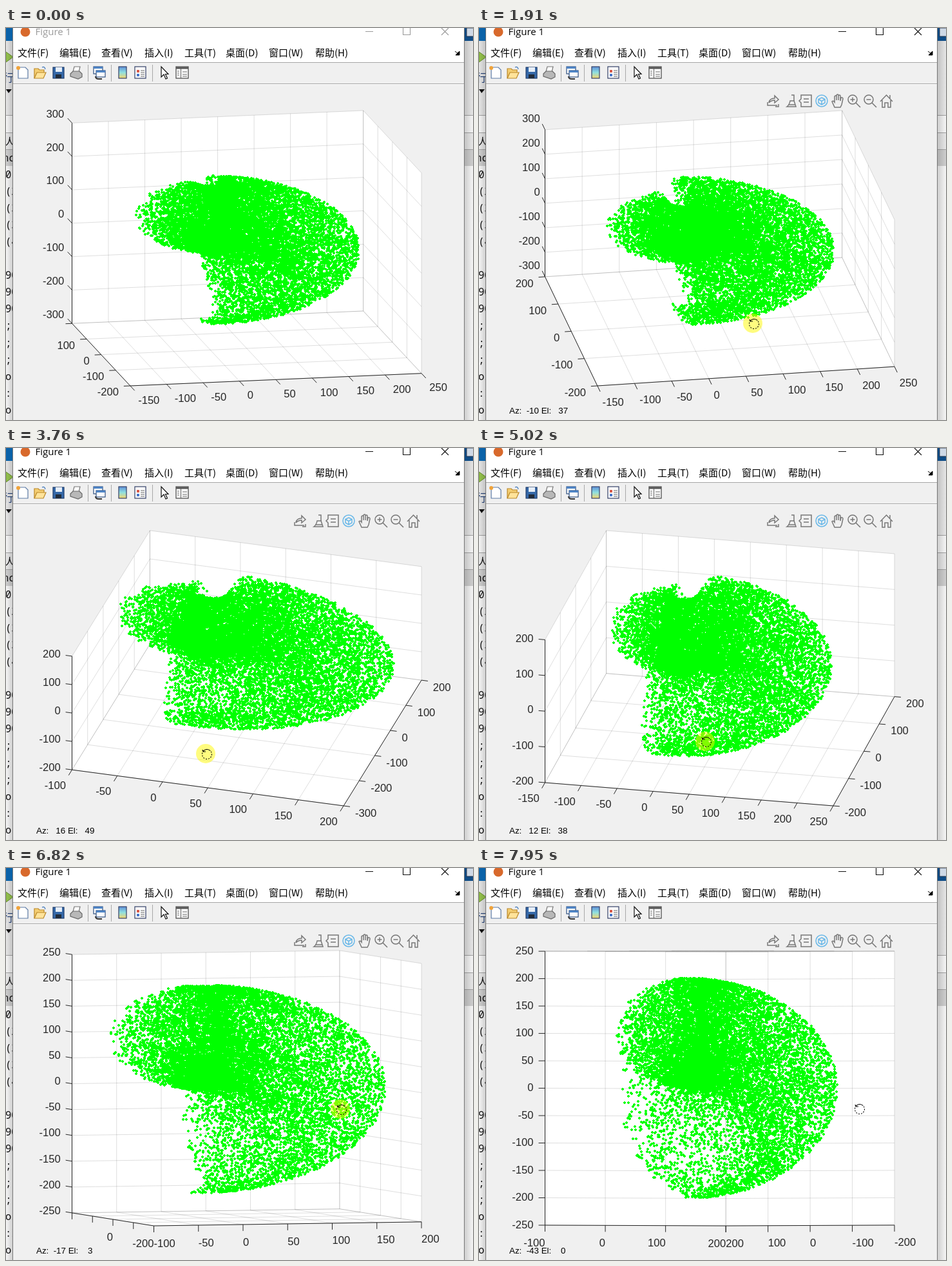
Write an HTML page with a canvas that moves like this. It is 725x608 px and loops after 8 s.

```html
<!DOCTYPE html>
<html lang="zh">
<head>
<meta charset="utf-8">
<title>Figure 1</title>
<style>
html, body { margin: 0; width: 100%; height: 100%; overflow: hidden; background: #fff; }
svg, canvas { position: absolute; left: 0; top: 0; width: 725px; height: 608px; }
.ui { font: 15px "Noto Sans CJK SC", "Noto Sans CJK", "Open Sans", sans-serif; }
.code { font: 15.5px "Noto Sans Mono", "Noto Sans CJK SC", monospace; fill: #111; }
.inactive .title { fill: #9a9a9a; }
.inactive .buttons { stroke: #9a9a9a; }
.line { fill: none; stroke: #777; stroke-width: 1.5; }
</style>
</head>
<body>
<svg id="chrome" viewBox="0 0 725 608">
  <linearGradient id="bar" x2="0" y2="1"><stop stop-color="#5f8fd8"/><stop offset=".5" stop-color="#8fe0e0"/><stop offset="1" stop-color="#f6d56a"/></linearGradient>
  <linearGradient id="shade"><stop stop-opacity=".04"/><stop offset="1" stop-opacity=".2"/></linearGradient>
  <!-- editor behind the figure window -->
  <rect width="725" height="608" fill="#fff"/>
  <rect width="11" height="20" fill="#0b62a8"/>
  <rect x="711" width="14" height="20" fill="#0f4c86"/>
  <rect y="20" width="725" height="115" fill="#efefef"/>
  <path d="M0 135.5H725M0 162.5H725M0 188.5H725" stroke="#a8a8a8"/>
  <rect y="163" width="725" height="25" fill="#f0f0f0"/>
  <rect y="189" width="725" height="25" fill="#d6d6d6"/>
  <path d="M0 37L11 45L0 53Z" fill="#9ccc50" stroke="#6b9430"/>
  <path d="M0 95H9L4 101Z" fill="#111"/>
  <rect x="715" y="0" width="12" height="13" fill="#cfd9e6" stroke="#25354d"/>
  <g class="code" id="code"></g>
  <rect y="20" width="11" height="588" fill="url(#shade)"/>
  <rect x="-725" y="20" width="14" height="588" fill="url(#shade)" transform="scale(-1 1)"/>
  <!-- figure window -->
  <rect x="11" width="700" height="608" fill="#f0f0f0"/>
  <rect x="11" width="700" height="53" fill="#fff"/>
  <path d="M10.5 0V608M711.5 0V608" stroke="#777"/>
  <path d="M11 53.5H711M11 86.5H711" stroke="#a6a6a6"/>
  <path d="M11 87.5H711" stroke="#fff"/>
  <circle cx="30" cy="6" r="7.5" fill="#d8692c"/>
  <text class="title" x="45.500" y="11" style="font:15px 'Open Sans',sans-serif">Figure 1</text>
  <path class="buttons" d="M558 5.500H570M616.500 -1V10.500H627.500V-1M676 0L687 11M687 0L676 11" fill="none" stroke="#111" stroke-width="1.100"/>
  <g class="ui" id="menu"></g>
  <path d="M697 36l5 4M704 36v6h-6z" stroke="#000" fill="#000"/>
  <!-- toolbar -->
  <path d="M127.500 57V83M163.500 57V83M227.500 57V83" stroke="#a9a9a9"/>
  <g stroke-width="1.200">
    <path d="M19 61H30L34 65V78H19Z" fill="#fff" stroke="#5c7aa5"/>
    <circle cx="19" cy="62" r="3" fill="#f0a33a"/>
    <path d="M44 78V63H50L52 65H59V69" fill="#f4ce72" stroke="#b98728"/>
    <path d="M44 78L48 69H62L58 78Z" fill="#ffe39a" stroke="#b98728"/>
    <path d="M56 61q4 -2 5 3" fill="none" stroke="#3d75b8"/>
    <rect x="73" y="61" width="17" height="17" fill="#3568a8" stroke="#1f3d6b"/>
    <rect x="77" y="61" width="10" height="7" fill="#e6eef8"/>
    <rect x="77" y="72" width="9" height="6" fill="#222c3a"/>
    <path d="M104 68L106 60H115L113 68Z" fill="#fff" stroke="#777"/>
    <path d="M100 71L104 67H114L118 71V76L112 79L100 75Z" fill="#b8b8b8" stroke="#666"/>
    <rect x="136" y="60" width="14" height="11" fill="#fff" stroke="#2d4f80"/>
    <path d="M136 61.500H150" stroke="#4d83c4" stroke-width="3"/>
    <rect x="140" y="66" width="14" height="10" fill="#fff" stroke="#2d4f80"/>
    <path d="M140 67.500H154" stroke="#4d83c4" stroke-width="3"/>
    <path d="M139 75q0 4 5 4h5" fill="none" stroke="#333" stroke-width="2"/>
    <rect x="175" y="60" width="12" height="18" fill="url(#bar)" stroke="#333f66"/>
    <rect x="200" y="60" width="17" height="18" fill="#fff" stroke="#333f66"/>
    <path d="M203 65h4v4h-4z" fill="#d75a4a"/><path d="M203 71h4v4h-4z" fill="#4a78cc"/>
    <path d="M209 66h6M209 69h6M209 72h6M209 75h6" stroke="#666"/>
    <path d="M241 60V76L245 72L248 79L250.500 78L247.500 71.500H252Z" fill="#fff" stroke="#111"/>
    <rect x="264" y="60" width="19" height="18" fill="#fff" stroke="#444"/>
    <path d="M264 62H283" stroke="#555" stroke-width="3"/>
    <path d="M271.500 63V78M266 67h3M266 70h3M266 73h3M274 68h7M274 72h7M274 75h7" stroke="#6a6a6a"/>
  </g>
  <!-- axes toolbar -->
  <g class="line" id="axesBar">
    <path d="M448 115v5h15M450 116q1 -7 9 -7v-4l6 6l-6 5v-4q-5 0 -9 4M465 118v4h-5"/>
    <path d="M485 104h4v9l3 9h-14q4 -3 5 -9h7M480 119h11" />
    <path d="M500 104h16v18h-16v-6l-3 -3l3 -3zM504 110h8M504 115h8"/>
    <g stroke="#69b8e8"><circle cx="532" cy="113" r="9"/><path d="M532 108l5 2.500v5.500l-5 3l-5 -3v-5.500zM527 110.500l5 3l5 -3M532 113.500v5"/></g>
    <path d="M552 123l-4 -9q2 -2 4 1v-9q2 -2 3 0v6v-8q2 -2 3 0v8v-7q2 -2 3 0v8l1 -5q3 -1 3 2l-2 9l-2 4z"/>
    <g id="lens"><circle cx="580" cy="111" r="7"/><path d="M585 116l7 7M576.500 111h7"/></g>
    <path d="M580 107.500v7"/>
    <use href="#lens" x="25"/>
    <path d="M623 114l9.500 -10l9.500 10M626 112v11h4v-7h5v7h4v-11M638 109v-5"/>
  </g>
</svg>
<canvas id="plot" width="725" height="608"></canvas>
<script>
const LOOP = 8000;
const chrome = document.getElementById('chrome');
const axesBar = document.getElementById('axesBar');
const ctx = document.getElementById('plot').getContext('2d');

function addText(parent, str, x, y, fill) {
  const el = document.createElementNS('http://www.w3.org/2000/svg', 'text');
  el.textContent = str;
  el.setAttribute('x', x);
  el.setAttribute('y', y);
  if (fill) el.setAttribute('fill', fill);
  document.getElementById(parent).append(el);
}
const menu = { '文件(F)': 18, '编辑(E)': 83, '查看(V)': 148, '插入(I)': 215, '工具(T)': 277, '桌面(D)': 341, '窗口(W)': 408, '帮助(H)': 480 };
for (const name in menu) addText('menu', name, menu[name], 44);
['0', '(2', '(3', '(3', '(4', '', '90', '90', '90', ';', ';', ';', 'os', ':I', 'o:']
  .forEach((s, i) => addText('code', s, -1, 232.5 + i * 26.1));
addText('code', '行', -4, 83, '#1f3f7a');
addText('code', '人', -2, 182);
addText('code', 'nc', -5, 207);

// Runs of picture updates: start, end, number of updates
const runs = [[120, 650, 9], [850, 1380, 9], [1640, 1770, 3], [1910, 2300, 7], [2440, 3230, 13], [3300, 3500, 4],
  [3760, 4030, 5], [4230, 5020, 11], [5090, 5680, 10], [5880, 6680, 13], [6750, 7490, 11], [7560, 7950, 6]];

function snap(t) {
  let last = 0;
  for (const [a, b, n] of runs) {
    if (t + 5 < a) break;
    const gap = (b - a) / (n - 1);
    last = a + Math.min(n - 1, Math.floor((t + 5 - a) / gap)) * gap;
  }
  return last;
}

// time, azimuth, elevation, pointer x, pointer y
const path = [
  [0, -11.3, 17.6, 540, 115], [120, -11.3, 17.6, 540, 115], [650, -11.3, 17.6, 427, 456],
  [850, -11.3, 17.6, 427, 456], [1380, -11.3, 17.6, 433, 405], [1575, -11.3, 17.6, 433, 405],
  [1910, -10, 37, 425, 458], [2300, -5, 41, 400, 466], [2770, 3, 49, 358, 477], [3230, 12, 50, 325, 478],
  [3500, 15.6, 49.2, 312, 475], [3760, 16, 49, 310, 474], [5020, 12, 38, 351, 455], [5680, -5, 24, 415, 425],
  [6680, -16, 4, 512, 376], [6824, -17, 3, 519, 374], [7490, -34, 1, 570, 374], [7950, -43, -.2, 591, 374]];

function poseAt(t) {
  let i = 0;
  while (i < path.length - 2 && path[i + 1][0] <= t) i++;
  const a = path[i], b = path[i + 1];
  const k = Math.min(1, (t - a[0]) / (b[0] - a[0]));
  return a.map((v, j) => v + (b[j] - v) * k).slice(1);
}

// Axis limits as [low, high, step]
const xWide = [-150, 250, 50], xTight = [-100, 200, 50], xCoarse = [-100, 200, 100];
const yEven = [-200, 200, 100], yDeep = [-300, 200, 100];
const zTall = [-300, 300, 100], zTight = [-200, 200, 100], zFine = [-250, 250, 50];
const limits = [[0, xWide, yEven, zTall], [2560, xWide, yDeep, zTight], [3290, xTight, yDeep, zTight],
  [4220, xWide, yEven, zTight], [5400, xWide, yEven, zTall], [6200, xTight, yEven, zFine], [7300, xCoarse, yEven, zFine]];

// Workspace of a three-joint arm: two equal links and a sideways shoulder offset
const LINK = 100, OFFSET = 18, SAMPLES = 15000;
let seed = 20231;
const random = () => (seed = (seed * 1664525 + 1013904223) % 4294967296) / 4294967296;
const cloud = Array.from({ length: SAMPLES }, () => {
  const base = (random() - .5) * Math.PI, lift = (random() - .5) * Math.PI, bend = lift + random() * Math.PI;
  const r = LINK * (Math.cos(lift) + Math.cos(bend));
  return [r * Math.cos(base) + OFFSET * Math.sin(base), r * Math.sin(base) - OFFSET * Math.cos(base),
    LINK * (Math.sin(lift) + Math.sin(bend))];
});

// Orthographic view of the unit cube, stretched to fill the axes rectangle
function makeView(az, el) {
  const A = az * Math.PI / 180, E = el * Math.PI / 180;
  const ux = Math.cos(A), uy = Math.sin(A);
  const vx = -Math.sin(E) * uy, vy = Math.sin(E) * ux, vz = Math.cos(E);
  const u0 = Math.min(0, uy), v0 = Math.min(0, vx) + Math.min(0, vy);
  const sx = 542.5 / (ux + Math.abs(uy)), sy = 427 / (Math.abs(vx) + Math.abs(vy) + vz);
  return (x, y, z) => [102.5 + (ux * x + uy * y - u0) * sx, 555 - (vx * x + vy * y + vz * z - v0) * sy];
}

const ticksOf = ([lo, hi, step]) =>
  Array.from({ length: (hi - lo) / step + 1 }, (_, i) => ({ value: lo + i * step, at: i * step / (hi - lo) }));

function line(a, b) {
  ctx.beginPath();
  ctx.moveTo(...a);
  ctx.lineTo(...b);
  ctx.stroke();
}

function direction(a, b) {
  const dx = b[0] - a[0], dy = b[1] - a[1], len = Math.hypot(dx, dy) || 1;
  return [dx / len, dy / len];
}

function drawAxis(ticks, point, inner, opts) {
  const out = direction(inner, point(0));
  const dir = opts.upright ? [0, 1] : out;
  const align = opts.vertical || out[0] < -.2 ? 'right' : out[0] > .2 ? 'left' : 'center';
  const drop = opts.vertical || (!opts.upright && Math.abs(out[1]) < .035) ? 0 : 10;
  line(point(0), point(1));
  ctx.textAlign = align;
  ticks.forEach(({ value, at }, i) => {
    const [x, y] = point(at);
    line([x, y], [x + dir[0] * 10, y + dir[1] * 10]);
    if (opts.hide && opts.hide(i)) return;
    ctx.fillText(value, x + dir[0] * 18, y + dir[1] * 18 + drop);
  });
}

function drawAxes(P, az, el, [X, Y, Z]) {
  const tx = ticksOf(X), ty = ticksOf(Y), tz = ticksOf(Z);
  const left = az < 0, below = el < 0;
  const wallX = left ? 1 : 0, floor = below ? 1 : 0;
  const faces = [
    (a, b) => P(a, b, floor), (a, b) => P(a, 1, b), (a, b) => P(wallX, a, b)];
  ctx.fillStyle = '#fff';
  for (const f of faces) {
    ctx.beginPath();
    [[0, 0], [1, 0], [1, 1], [0, 1]].forEach(c => ctx.lineTo(...f(...c)));
    ctx.fill();
  }
  ctx.lineWidth = 1;
  ctx.strokeStyle = 'rgba(38,38,38,.15)';
  [[tx, ty], [tx, tz], [ty, tz]].forEach(([ta, tb], i) => {
    for (const { at } of ta) line(faces[i](at, 0), faces[i](at, 1));
    for (const { at } of tb) line(faces[i](0, at), faces[i](1, at));
  });

  ctx.strokeStyle = ctx.fillStyle = '#262626';
  ctx.font = '16.6px "Liberation Sans", Arial, sans-serif';
  ctx.textBaseline = 'middle';
  const upright = el < 8;
  const yEdge = below ? 1 : 0, xEdge = left !== below ? 0 : 1;
  drawAxis(tx, s => P(s, yEdge, 0), P(0, 1 - yEdge, 0), { upright });
  const crowded = upright && left && !below && az > -30;
  drawAxis(ty, s => P(xEdge, s, 0), P(1 - xEdge, 0, 0), {
    upright,
    hide: i => left && !below && ((el < 25 && i === ty.length - 1) || (crowded && i % 2 === 1))
  });
  const zEdge = left ? 1 : 0;
  drawAxis(tz, s => P(0, zEdge, s), left ? P(0, 0, 0) : P(1, 0, 0), { vertical: true });
}

function drawCloud(P, [X, Y, Z]) {
  const norm = (v, [lo, hi]) => (v - lo) / (hi - lo);
  ctx.fillStyle = '#0f0';
  for (const [x, y, z] of cloud) {
    const [px, py] = P(norm(x, X), norm(y, Y), norm(z, Z)).map(Math.round);
    ctx.fillRect(px - 2, py - 1, 4, 2);
    ctx.fillRect(px - 1, py - 2, 2, 4);
  }
}

function drawPointer(x, y, pressed) {
  if (pressed) {
    ctx.fillStyle = 'rgba(255,250,0,.5)';
    ctx.beginPath();
    ctx.arc(x, y, 15, 0, 7);
    ctx.fill();
    x += 2;
    y += 1;
  }
  ctx.strokeStyle = '#000';
  ctx.lineWidth = 1.1;
  ctx.setLineDash([2, 2]);
  ctx.beginPath();
  ctx.arc(x, y, 7.5, -.6, 3.5);
  ctx.stroke();
  ctx.setLineDash([]);
  ctx.beginPath();
  ctx.arc(x, y, 7.5, 3.8, 5.5);
  ctx.moveTo(x - 7, y - 7);
  ctx.lineTo(x - 6, y - 4);
  ctx.lineTo(x - 2, y - 4);
  ctx.stroke();
}

function draw(t) {
  const [az, el, cx, cy] = poseAt(t);
  const range = limits.filter(l => l[0] <= t).pop().slice(1);
  const P = makeView(az, el);
  chrome.classList.toggle('inactive', t < 120);
  axesBar.style.display = t < 250 ? 'none' : '';
  ctx.clearRect(0, 0, 725, 608);
  drawAxes(P, az, el, range);
  drawCloud(P, range);
  if (t >= 1640) {
    const pad = v => String(Math.round(v)).padStart(4);
    ctx.font = '13.33px "Liberation Sans", Arial, sans-serif';
    ctx.textAlign = 'left';
    ctx.fillStyle = '#000';
    ctx.fillText(`Az: ${pad(az)} El: ${pad(el)}`, 47, 594.5);
  }
  if (t >= 250) drawPointer(cx, cy, t >= 1640 && t < 7900);
}

let start, shown = -1;
function tick(now) {
  start ??= now;
  const t = snap((now - start) % LOOP);
  if (t !== shown) draw(shown = t);
  requestAnimationFrame(tick);
}
draw(0);
requestAnimationFrame(tick);
</script>
</body>
</html>
```
